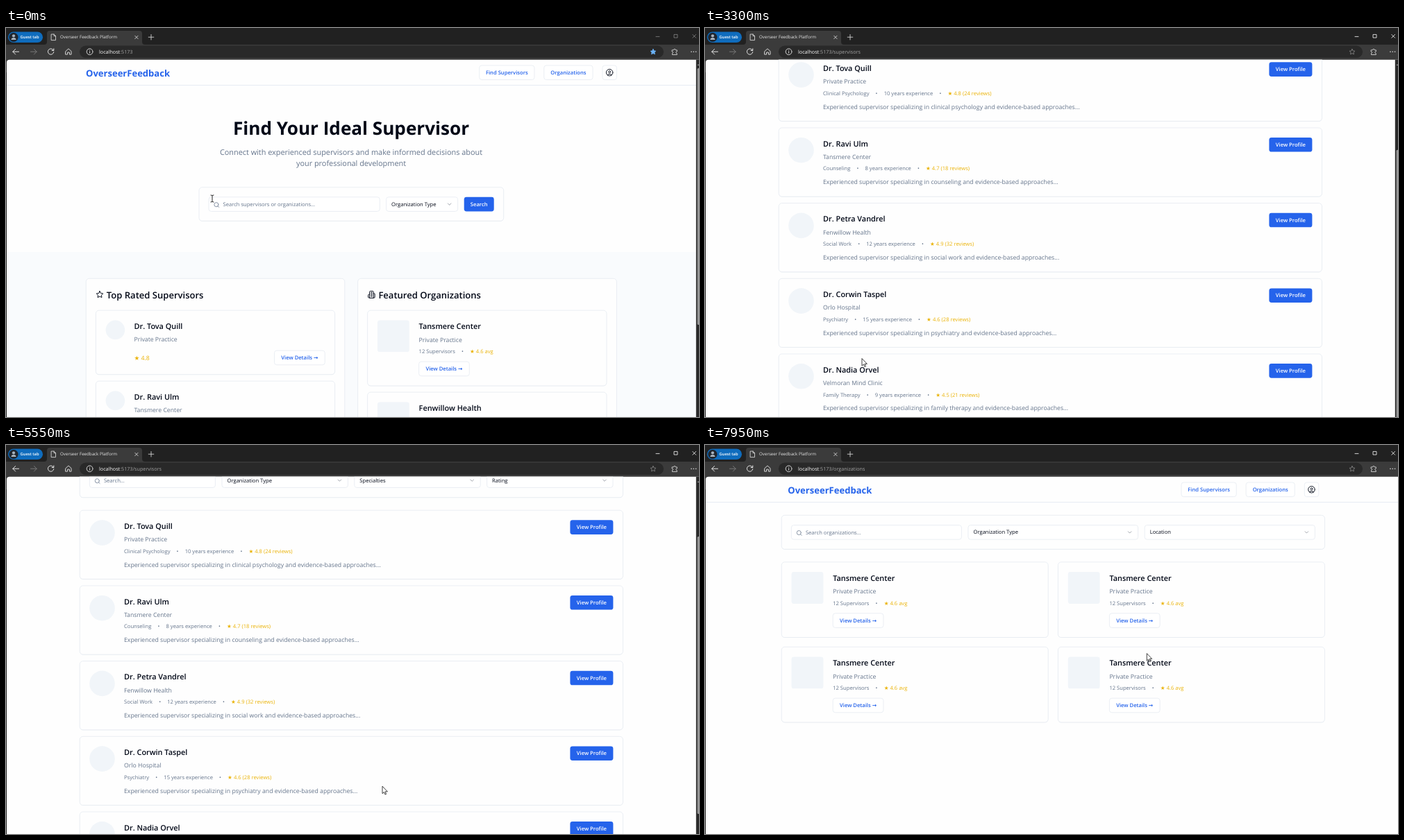
An HTML page for the animation above (8 s loop, 998 by 561 pixels).

```html
<!DOCTYPE html>
<html lang="en">
<head>
<meta charset="utf-8">
<title>Supervisor directory</title>
<style>
  html, body { margin: 0; width: 100%; height: 100%; overflow: hidden; background: #212121; }
  svg { display: block; width: 998px; height: 561px; }
  text { font-family: "Open Sans", "DejaVu Sans", sans-serif; text-rendering: geometricPrecision; white-space: pre; }
</style>
</head>
<body>
<svg id="stage" viewBox="0 0 998 561" xmlns="http://www.w3.org/2000/svg"></svg>
<script>
const LOOP = 8000, STEP = 150;
const ZOOM = 0.572, FONT_FIT = 0.951;
const INK = '#020817', MUTED = '#64748b', LINE = '#e2e8f0', SOFT = '#f1f5f9',
      BLUE = '#2563eb', GOLD = '#eab308', PAPER = '#fefefe';

// Drawing helpers: coordinates in stage pixels, font sizes in page pixels.
const text = (x, cy, str, px, { weight = 400, fill = INK, anchor = 'start' } = {}) => {
  const size = px * ZOOM * FONT_FIT;
  return `<text x="${x}" y="${(cy + size * 0.35).toFixed(2)}" font-size="${size.toFixed(2)}" font-weight="${weight}" fill="${fill}" text-anchor="${anchor}">${str}</text>`;
};
const box = (x, y, w, h, { r = 3.4, fill = '#fff', stroke = LINE } = {}) =>
  `<rect x="${x}" y="${y}" width="${w}" height="${h}" rx="${r}" fill="${fill}" stroke="${stroke}" stroke-width=".7"/>`;
const card = (x, y, w, h) =>
  `<rect x="${x}" y="${y + .6}" width="${w}" height="${h}" rx="4.6" fill="#f0f3f6"/>` + box(x, y, w, h, { r: 4.6, fill: PAPER });
const disc = (cx, cy, r, fill) => `<circle cx="${cx}" cy="${cy}" r="${r}" fill="${fill}"/>`;
const path = (d, stroke, width = 1, fill = 'none') =>
  `<path d="${d}" fill="${fill}" stroke="${stroke}" stroke-width="${width}" stroke-linecap="round" stroke-linejoin="round"/>`;
const group = (id, body) => `<g id="${id}">${body}</g>`;

const ICONS = {
  search: 'M21 21l-4.3-4.3M19 11a8 8 0 1 1-16 0a8 8 0 0 1 16 0',
  chevron: 'M6 9l6 6 6-6',
  star: 'M12 2l3.1 6.3 6.9 1-5 4.8 1.2 6.9-6.2-3.2L5.8 21 7 14.1 2 9.3l6.9-1z',
  filter: 'M22 3H2l8 9.5V19l4 2v-8.5z',
  user: 'M22 12a10 10 0 1 1-20 0a10 10 0 0 1 20 0M15 10a3 3 0 1 1-6 0a3 3 0 0 1 6 0M7 20.6V19a2 2 0 0 1 2-2h6a2 2 0 0 1 2 2v1.6',
  building: 'M6 22V4a2 2 0 0 1 2-2h8a2 2 0 0 1 2 2v18zM6 12H4a2 2 0 0 0-2 2v6a2 2 0 0 0 2 2h2M18 9h2a2 2 0 0 1 2 2v9a2 2 0 0 1-2 2h-2M10 6h4M10 10h4M10 14h4M10 18h4'
};
const icon = (name, cx, cy, px, color = INK, fill = 'none') => {
  const k = px * ZOOM / 24;
  return `<g transform="translate(${cx} ${cy}) scale(${k}) translate(-12 -12)">${path(ICONS[name], color, 2, fill)}</g>`;
};

// Page widgets
const outlineButton = (x, y, w, label) =>
  box(x, y, w, 20.6) + text(x + w / 2, y + 10.2, label, 14, { weight: 600, fill: BLUE, anchor: 'middle' });
const solidButton = (x, y, w, label) =>
  box(x, y, w, 20.6, { fill: BLUE, stroke: 'none' }) + text(x + w / 2, y + 10.3, label, 14, { weight: 600, fill: '#fff', anchor: 'middle' });
const input = (x, y, w, hint) =>
  box(x, y, w, 20.6) + icon('search', x + 11.3, y + 11.3, 16, MUTED) + text(x + 20.5, y + 10.6, hint, 14, { fill: MUTED });
const select = (x, y, w, label) =>
  box(x, y, w, 20.6) + text(x + 7.5, y + 10.2, label, 14) + icon('chevron', x + w - 12, y + 10.3, 16, '#858a95');
const facts = (x, cy, ...items) => {
  const rating = items.pop();
  const dot = '<tspan dx="9.15">•</tspan>';
  return text(x, cy, items.map((s, i) => (i ? `${dot}<tspan dx="9.15">${s}</tspan>` : s)).join('') +
    `${dot}<tspan dx="9.15" fill="${GOLD}">★ ${rating}</tspan>`, 14, { fill: MUTED });
};
const header = (dx, width) =>
  `<rect x="0" y="82" width="${width}" height=".8" fill="${LINE}"/>` +
  text(115 + dx, 65, 'OverseerFeedback', 24, { weight: 700, fill: BLUE }) +
  outlineButton(681.7 + dx, 54, 79.2, 'Find Supervisors') +
  outlineButton(774.8 + dx, 54, 70.2, 'Organizations') +
  box(859 + dx, 54, 20.5, 20.6) + icon('user', 869.2 + dx, 64.2, 20);

const orgCard = (x, y, w, name) =>
  card(x, y, w, 108.7) +
  `<rect x="${x + 14.4}" y="${y + 14.3}" width="45.8" height="45.8" rx="3.4" fill="${SOFT}"/>` +
  text(x + 74, y + 23, name, 20, { weight: 600 }) +
  text(x + 74, y + 42.3, 'Private Practice', 16, { fill: MUTED }) +
  facts(x + 74, y + 59.4, '12 Supervisors', '4.6 avg') +
  outlineButton(x + 74, y + 74, 72.7, 'View Details →');

const topRated = (y, name, place) =>
  card(129.3, y, 344.3, 92.5) + disc(157.4, y + 28.2, 13.8, SOFT) +
  text(184.5, y + 23, name, 20, { weight: 600 }) +
  text(184.5, y + 42.2, place, 16, { fill: MUTED }) +
  text(184.5, y + 68.6, '★ 4.8', 16, { fill: GOLD }) +
  outlineButton(386.5, y + 58, 72.7, 'View Details →');

const homePage = () =>
  `<rect x="0" y="323" width="994" height="400" fill="#f9fbfd"/>` + header(0, 994) +
  text(497, 144.5, 'Find Your Ideal Supervisor', 48, { weight: 700, anchor: 'middle' }) +
  ['Connect with experienced supervisors and make informed decisions about', 'your professional development']
    .map((s, i) => text(497, 179 + 16 * i, s, 20, { fill: MUTED, anchor: 'middle' })).join('') +
  card(278, 229.7, 438.7, 48.6) +
  input(292, 243.8, 246.2, 'Search supervisors or organizations...') +
  select(547.6, 243.8, 103, 'Organization Type') + solidButton(659.7, 243.8, 43, 'Search') +
  card(115.2, 361.3, 372.6, 300) + card(506.6, 361.3, 372.8, 300) +
  icon('star', 135, 384.3, 20) + text(144.8, 385.5, 'Top Rated Supervisors', 24, { weight: 600 }) +
  icon('building', 526.4, 384.3, 20) + text(536.4, 385.5, 'Featured Organizations', 24, { weight: 600 }) +
  topRated(407.2, 'Dr. Tova Quill', 'Private Practice') + topRated(509.2, 'Dr. Ravi Ulm', 'Tansmere Center') +
  orgCard(520.6, 407.2, 344.4, 'Tansmere Center') + orgCard(520.6, 525.2, 344.4, 'Fenwillow Health');

const PEOPLE = [
  ['Dr. Tova Quill', 'Private Practice', 'Clinical Psychology', 10, '4.8 (24 reviews)'],
  ['Dr. Ravi Ulm', 'Tansmere Center', 'Counseling', 8, '4.7 (18 reviews)'],
  ['Dr. Petra Vandrel', 'Fenwillow Health', 'Social Work', 12, '4.9 (32 reviews)'],
  ['Dr. Corwin Taspel', 'Orlo Hospital', 'Psychiatry', 15, '4.6 (28 reviews)'],
  ['Dr. Nadia Orvel', 'Velmoran Mind Clinic', 'Family Therapy', 9, '4.5 (21 reviews)']
];
const personCard = ([name, place, field, years, rating], i) => {
  const y = 194.2 + 108.7 * i;
  return card(106.2, y, 782.3, 99.2) + disc(138.5, y + 32.3, 18.3, SOFT) +
    text(170, y + 23, name, 20, { weight: 600 }) +
    text(170, y + 42, place, 16, { fill: MUTED }) +
    facts(170, y + 58.9, field, `${years} years experience`, rating) +
    text(170, y + 78.4, `Experienced supervisor specializing in ${field.toLowerCase()} and evidence-based approaches...`, 16, { fill: MUTED }) +
    solidButton(812.4, y + 14.1, 62, 'View Profile');
};
const supervisorsPage = () =>
  header(0, 994) + card(106.2, 101.3, 782.3, 74.4) +
  icon('filter', 126, 123.5, 20) + text(135.8, 124.2, 'Filter Supervisors', 18, { weight: 600 }) +
  input(120.4, 140.8, 181, 'Search...') +
  ['Organization Type', 'Specialties', 'Rating'].map((s, i) => select(311 + 190.8 * i, 140.8, 181.4, s)).join('') +
  PEOPLE.map(personCard).join('');

const organizationsPage = () =>
  header(4.3, 998) + card(110.2, 101.3, 782.3, 49) +
  input(124.4, 115.6, 245, 'Search organizations...') +
  select(379, 115.6, 244.6, 'Organization Type') + select(633.2, 115.6, 245.2, 'Location') +
  [0, 1, 2, 3].map(i => orgCard(110.2 + 398.2 * (i % 2), 168.8 + 122.4 * (i >> 1), 384, 'Tansmere Center')).join('');

// Browser frame
const chrome = () => {
  const light = '#e6e6e6', dim = '#8a8a8a';
  const label = (x, cy, str, size, fill, weight = 400) => text(x, cy, str, size / ZOOM / FONT_FIT, { fill, weight });
  return `<rect width="998" height="561" fill="#212121"/><rect y="24" width="998" height="40" fill="#3b3b3b"/>` +
    path('M55 24Q59 24 59 20V8Q59 4 63 4H192Q196 4 196 8V20Q196 24 200 24Z', 'none', 0, '#3b3b3b') +
    `<rect x="3" y="5.5" width="50" height="15.6" rx="7.8" fill="#0f6cbd"/>` +
    disc(11, 13.3, 6.6, '#20262e') + disc(11, 11.3, 2.1, '#a9b4bf') + path('M7.5 17a3.5 3 0 0 1 7 0z', 'none', 0, '#a9b4bf') +
    label(20.5, 13.3, 'Guest tab', 5.8, '#fff', 600) +
    path('M65.5 9h3.6l2.4 2.4v6.2h-6zM69 9v2.5h2.5', light, .8) +
    label(78, 13.3, 'Overseer Feedback Platform', 6.2, light) +
    path('M185.7 11.2l4.4 4.4M190.1 11.2l-4.4 4.4M205.2 13.2h7.6M209 9.4v7.6', light, .8) +
    group('controls', path('M936 12.4h5M962.4 9.4h4.6v4.6h-4.6zM988.8 9.4l4.8 4.8M993.6 9.4l-4.8 4.8', '#fff', .8)) +
    path('M18.5 34.2H9.8M13.6 30.4l-3.8 3.8 3.8 3.8', light) +
    path('M35.5 34.2h8.7M40.4 30.4l3.8 3.8-3.8 3.8', '#777') +
    path('M68.4 32.2a4.2 4.2 0 1 0 .4 2.4M68.8 29.8v2.7h-2.7', light) +
    path('M86 33.5l4-3.6 4 3.6v4.6h-2.6v-3h-2.8v3H86z', light, .9) +
    `<rect x="106" y="25.6" width="841" height="17.4" rx="8.7" fill="#292929"/>` +
    path('M125 34.2a4.4 4.4 0 1 1-8.8 0a4.4 4.4 0 0 1 8.8 0M120.6 33.8v2.4M120.6 32v.1', light, .9) +
    `<text x="134" y="37" font-size="7.2" fill="#fff">localhost<tspan id="route" fill="#a5a5a5"></tspan></text>` +
    group('bookmark', icon('star', 932, 34.3, 16.5, '#6ab1f5', '#6ab1f5')) +
    group('bookmarkOff', icon('star', 932, 34.3, 16.5, dim)) +
    path('M959.5 31.8h2a1.4 1.4 0 0 1 2.8 0h2v2.2a1.4 1.4 0 0 0 0 2.8v1.7h-6.8v-2a1.2 1.2 0 0 0 0-2.4z', light, .8) +
    [987, 990.3, 993.6].map(x => disc(x, 34.3, .8, light)).join('');
};

const cursors = () =>
  group('arrow', path('M0 0V10.2L2.4 8 4 11.6 5.6 10.9 4 7.4H7z', '#111', .8, '#fff')) +
  group('beam', path('M-2-5Q0-5 0-4Q0-5 2-5M0-4V4M-2 5Q0 5 0 4Q0 5 2 5', '#111', .9)) +
  group('hand', path('M-1 1Q0-.8 1 1V5L5 5.8Q6.4 6.2 6.2 8L5.4 12H-.2L-3.2 8Q-3.2 6.4-1 7.6Z', '#111', .8, '#fff'));

const SVG = document.getElementById('stage');
SVG.innerHTML = `<defs><clipPath id="view"><path d="M1 561V50Q1 45.8 5.2 45.8H998V561Z"/></clipPath></defs>` + chrome() +
  `<g clip-path="url(#view)"><rect x="1" y="45" width="997" height="516" fill="${PAPER}"/>` +
  group('home', homePage()) + group('supervisors', supervisorsPage()) + group('organizations', organizationsPage()) +
  group('scrollbar', `<rect x="993.8" y="45" width="5" height="516" fill="#2b2b2b"/>` + path('M995.6 54l1.4-2 1.4 2z', 'none', 0, '#9b9b9b') +
    `<rect id="thumb" x="995.6" width="4" rx="1.6" fill="#9b9b9b"/>`) +
  `</g>` + group('cursor', cursors());
const el = Object.fromEntries([...SVG.querySelectorAll('[id]')].map(n => [n.id, n]));

// Timelines: [ms, ...values]
const POINTER = [
  [0, 297, 246], [150, 297, 246], [1200, 723, 64], [1350, 724, 72], [2250, 724, 72], [2700, 232.5, 206],
  [3300, 226, 477], [3900, 102, 470], [4200, 207.5, 457], [5100, 517, 447], [6000, 567, 538],
  [6450, 684, 243], [6900, 808, 66], [7650, 808, 66], [7950, 636.3, 301]
];
const SCROLL = [
  [0, 0], [2700, 0], [2850, 30], [3000, 92], [3150, 145], [3300, 159], [4050, 159], [4200, 144.7], [4350, 104],
  [4500, 58], [4650, 20], [4800, 4], [4950, 0], [5100, 7], [5250, 42], [5400, 82], [5550, 100], [5700, 100],
  [5850, 78], [6000, 42.5], [6150, 12], [6300, 0]
];
const SHAPES = [[0, 'beam'], [300, 'arrow'], [1200, 'hand'], [2400, 'arrow'], [4200, 'beam'], [4350, 'arrow'], [6900, 'hand'], [7800, 'arrow']];
const PAGES = [[0, 'home'], [1950, 'supervisors'], [7500, 'organizations']];

const held = (rows, t) => rows.findLast(r => r[0] <= t)[1];
const tween = (rows, t) => {
  const i = rows.findLastIndex(r => r[0] <= t);
  const [t0, ...from] = rows[i], next = rows[i + 1];
  return next ? from.map((v, k) => v + (next[k + 1] - v) * (t - t0) / (next[0] - t0)) : from;
};
const show = (node, on) => node.setAttribute('display', on ? 'inline' : 'none');

function render(now) {
  const t = Math.floor(now % LOOP / STEP) * STEP;
  const page = held(PAGES, t), shape = held(SHAPES, t);
  const [x, y] = tween(POINTER, t), [scroll] = tween(SCROLL, t);
  for (const [, name] of PAGES) show(el[name], name === page);
  for (const name of ['arrow', 'beam', 'hand']) show(el[name], name === shape);
  el.cursor.setAttribute('transform', `translate(${x} ${y})`);
  el.supervisors.setAttribute('transform', `translate(0 ${-scroll})`);
  show(el.scrollbar, page !== 'organizations');
  el.thumb.setAttribute('y', 58 + scroll * 0.74);
  el.thumb.setAttribute('height', page === 'home' ? 370 : 400);
  show(el.bookmark, page === 'home');
  show(el.bookmarkOff, page !== 'home');
  el.controls.setAttribute('opacity', t < 300 ? 0.45 : 1);
  el.route.textContent = ':5173' + (page === 'home' ? '' : '/' + page);
  requestAnimationFrame(() => render(performance.now()));
}
render(performance.now());
</script>
</body>
</html>
```
